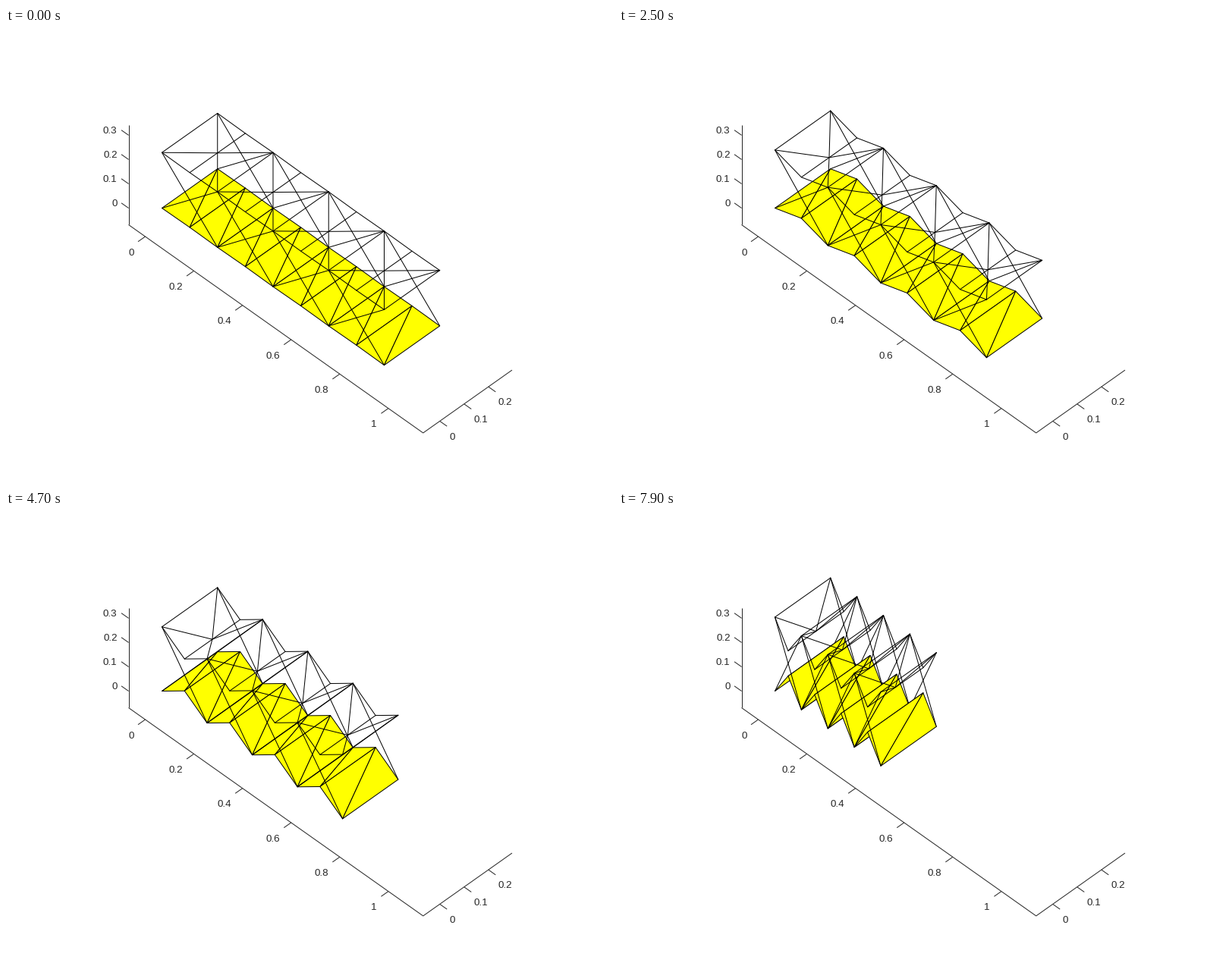
Write a matplotlib script that moves like this. It is 800x600 px and loops after 8 s.

```python
import numpy as np
import matplotlib.pyplot as plt
from matplotlib.animation import FuncAnimation
from matplotlib.collections import LineCollection, PolyCollection

W, H, DPI = 800, 600, 100
PX = 72 / DPI                      # one pixel in points
SCALE, OX, OY = 320.4, 205.5, 237.5
CELL = 0.2286                      # width of one square cell
HALF = CELL / 2
CELLS = 4
LOW = -0.3 * CELL                  # lower axis limit, all axes
X_MAX, Y_MAX, Z_MAX = 5 * CELL, 1.3 * CELL, 1.5 * CELL
INK = "#262626"
STEP = np.radians(0.81)

plt.rcParams["font.family"] = "Liberation Sans"
fig = plt.figure(figsize=(W / DPI, H / DPI), dpi=DPI, facecolor="white")
ax = fig.add_axes([0, 0, 1, 1])
ax.set_xlim(0, W)
ax.set_ylim(H, 0)
ax.axis("off")


def project(x, y, z):
    return (OX + SCALE * (x + y),
            OY + SCALE * ((x - y) * np.sqrt(0.5) - z))


def stroke(points):
    xs, ys = zip(*points)
    ax.plot(xs, ys, color=INK, lw=PX, solid_capstyle="butt")


def tick(point, direction, label, offset, align):
    px, py = point
    dx, dy = direction
    stroke([point, (px + dx, py + dy)])
    ax.text(px + offset[0], py + offset[1] + 4.7, label, color=INK,
            fontsize=13.33 * PX, ha=align, va="baseline")


def draw_axes():
    stroke([project(LOW, LOW, Z_MAX), project(LOW, LOW, LOW)])
    stroke([project(LOW, LOW, LOW), project(X_MAX, LOW, LOW),
            project(X_MAX, Y_MAX, LOW)])
    for i in range(6):
        v = i / 5
        tick(project(v, LOW, LOW), (-9.5, 6.7), f"{v:g}", (-15, 20), "right")
    for i in range(3):
        v = i / 10
        tick(project(X_MAX, v, LOW), (9.5, 6.7), f"{v:g}", (12.5, 19.6), "left")
    for i in range(4):
        v = i / 10
        tick(project(LOW, LOW, v), (-9.5, -6.7), f"{v:g}", (-15, -7.5), "right")


draw_axes()
style = dict(linewidths=PX, joinstyle="round", capstyle="round")
back = LineCollection([], colors="black", zorder=3, **style)
sheet = PolyCollection([], facecolors="yellow", edgecolors="black",
                       linewidths=PX, joinstyle="round", zorder=4)
front = LineCollection([], colors="black", zorder=5, **style)
for group in (back, sheet, front):
    ax.add_collection(group)


def build(theta):
    """Return back braces, sheet triangles and front lines on screen."""
    c, s = np.cos(theta), np.sin(theta)
    # the side braces keep their length, so the height follows the fold
    height = CELL * np.sqrt(2 - c * c)

    def low(k, y):
        return project(k * HALF * c, y * CELL, (k % 2) * HALF * s)

    def top(k, y):
        return project(k * HALF * c, y * CELL, height - (k % 2) * HALF * s)

    def braces(y):
        lines = []
        for k in range(0, 2 * CELLS, 2):
            lines += [[top(k, y), low(k + 2, y)], [low(k, y), top(k + 2, y)]]
        return lines

    faces = []
    for k in range(2 * CELLS):
        faces += [[low(k, 0), low(k + 1, 0), low(k, 1)],
                  [low(k + 1, 0), low(k + 1, 1), low(k, 1)]]

    n = 2 * CELLS + 1
    lines = [[top(k, y) for k in range(n)] for y in (0, 1)]
    lines += [[top(k, 0), top(k, 1)] for k in range(n)]
    for k in range(0, 2 * CELLS, 2):
        mid = top(k + 1, 0.5)
        lines += [[top(k, 0), mid, top(k + 2, 1)],
                  [top(k, 1), mid, top(k + 2, 0)]]
    return braces(1), faces, lines + braces(0)


def update(i):
    theta = STEP * max(i - 3, 1)   # rests for half a second, then folds
    rear, faces, lines = build(theta)
    back.set_segments(rear)
    sheet.set_verts(faces)
    front.set_segments(lines)
    return back, sheet, front


anim = FuncAnimation(fig, update, frames=80, interval=100,
                     repeat=True, repeat_delay=0, blit=False)
plt.show()
```
